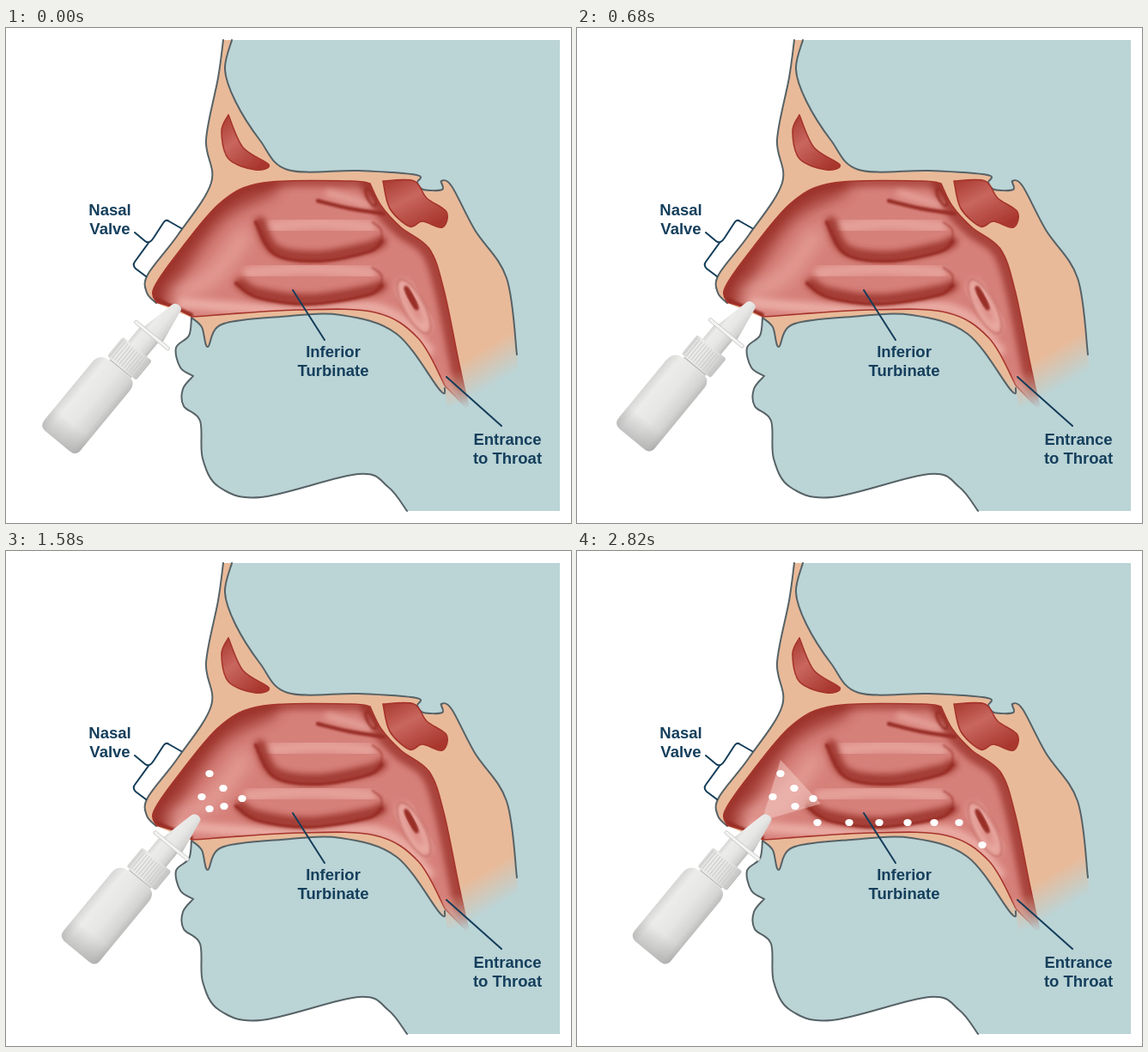
An HTML page for the animation above (3440 ms loop, 658 by 576 pixels).

```html
<!DOCTYPE html>
<html lang="en">
<head>
<meta charset="utf-8">
<title>Nasal spray</title>
<style>
html, body { margin: 0; width: 100%; height: 100%; overflow: hidden; background: #fff; }
svg { display: block; }
text { font: bold 18.5px "Liberation Sans", Arial, sans-serif; fill: #153f5c; text-anchor: middle; }
.line, .label, .dark, .light, .rim { fill: none; stroke-linecap: round; }
.line { stroke: #566266; stroke-width: 2; }
.label { stroke: #143d59; stroke-width: 2; }
.dark { stroke: #982d25; }
.light { stroke: #e9aaa3; }
.rim { stroke: #a5342c; stroke-width: 1.6; }
.b1 { filter: url(#blur1); }
.b3 { filter: url(#blur3); }
.b8 { filter: url(#blur8); }
</style>
</head>
<body>
<svg width="658" height="576" viewBox="0 0 658 576">
  <defs>
    <filter id="blur1" x="-30%" y="-30%" width="160%" height="160%"><feGaussianBlur stdDeviation="1.2"/></filter>
    <filter id="blur3" x="-30%" y="-80%" width="160%" height="260%"><feGaussianBlur stdDeviation="3.5"/></filter>
    <filter id="blur8" x="-30%" y="-60%" width="160%" height="220%"><feGaussianBlur stdDeviation="8"/></filter>
    <linearGradient id="flesh" gradientUnits="userSpaceOnUse" x1="535" y1="385" x2="557" y2="422">
      <stop stop-color="#e9ba99"/><stop offset="1" stop-color="#e9ba99" stop-opacity="0"/>
    </linearGradient>
    <linearGradient id="fade" gradientUnits="userSpaceOnUse" x1="518" y1="400" x2="530" y2="444">
      <stop stop-color="#fff"/><stop offset="1" stop-color="#000"/>
    </linearGradient>
    <linearGradient id="sinus" x2=".7" y2="1">
      <stop stop-color="#a8382f"/><stop offset=".45" stop-color="#c8665e"/><stop offset="1" stop-color="#a9372f"/>
    </linearGradient>
    <linearGradient id="plastic">
      <stop stop-color="#d6d7d5"/><stop offset=".2" stop-color="#ececeb"/><stop offset=".55" stop-color="#e6e6e5"/>
      <stop offset=".85" stop-color="#d4d4d2"/><stop offset="1" stop-color="#bcbdbb"/>
    </linearGradient>
    <linearGradient id="base" x2="0" y2="1">
      <stop offset=".75" stop-color="#999" stop-opacity="0"/><stop offset="1" stop-color="#999" stop-opacity=".5"/>
    </linearGradient>
    <clipPath id="inside"><path data-shape="cavity"/></clipPath>
    <mask id="throat" maskUnits="userSpaceOnUse" x="0" y="0" width="658" height="576">
      <rect width="658" height="576" fill="url(#fade)"/>
    </mask>
    <path id="body" d="M-28-6V-92Q-28-106-14-107H17Q27-106 27-94V-5Q27 4 18 4H-19Q-28 4-28-6Z"/>
  </defs>

  <path data-shape="head" fill="#bbd4d6"/>
  <path data-shape="face" class="line"/>
  <path data-shape="skin" fill="url(#flesh)"/>
  <path data-shape="front" class="line"/>
  <path data-shape="back" class="line"/>
  <path data-shape="floor" class="line"/>

  <g mask="url(#throat)">
    <g clip-path="url(#inside)">
      <path data-shape="cavity" fill="#d6807a"/>
      <path data-shape="roof" class="dark b3" stroke-width="15" opacity=".6"/>
      <path data-curve="172 312 205 256 245 206 300 178" class="dark b8" stroke-width="38" opacity=".8"/>
      <path data-shape="wall" class="dark b3" stroke-width="22" opacity=".75"/>
      <path data-curve="206 320 300 327 435 327 492 375" class="light b3" stroke-width="13"/>
      <path data-curve="200 308 240 290 276 244" class="light b8" stroke-width="20" opacity=".6"/>
      <path data-curve="173 316 215 334" class="dark b1" stroke-width="6"/>

      <g id="turbinates"></g>

      <path data-curve="376 192 424 206" class="light b3" stroke-width="8" opacity=".8"/>
      <path data-curve="363 201 400 210 440 216" class="dark b1" stroke-width="4.5"/>
      <ellipse class="dark b1" rx="4" ry="11" stroke-width="2.5" transform="translate(425 197) rotate(-28)"/>

      <g transform="translate(475 324) rotate(-28)">
        <ellipse class="light b3" rx="8" ry="30" stroke-width="9"/>
        <ellipse class="dark b1" rx="12" ry="35" stroke-width="1.5" opacity=".4"/>
        <ellipse class="dark b1" cx="2" cy="-10" rx="2" ry="14" stroke-width="4"/>
      </g>
    </g>
    <path data-shape="cavity" class="rim"/>
  </g>

  <path data-shape="frontal" class="rim" style="fill:url(#sinus)"/>
  <path data-shape="sphenoid" class="rim" style="fill:url(#sinus)"/>

  <path class="label" d="M204 233 190 225Q186 222 183 227L172 244Q167 252 162 248L150 238M166 250 150 272Q147 276 151 280L163 289"/>
  <path class="label" d="M334 305 371 363M513 406 577 463"/>
  <text x="121" y="218">Nasal</text><text x="121" y="240">Valve</text>
  <text x="381" y="383">Inferior</text><text x="381" y="405">Turbinate</text>
  <text x="584" y="485">Entrance</text><text x="584" y="507">to Throat</text>

  <path id="cone" d="M237 243 284 294 222 312 217 308Z" fill="#f6cfc9" fill-opacity=".5"/>
  <g id="dots" fill="#fff"></g>

  <g id="bottle">
    <g transform="translate(63 478) rotate(39.5)" fill="url(#plastic)">
      <path d="M-11-136H17V-162H-11Z"/>
      <path d="M-8-161 1-202Q2-208 8-208T14-202L21-161Z"/>
      <rect x="-20" y="-163" width="52" height="4" rx="2" fill="#f3f3f2" stroke="#c4c5c3" stroke-width=".8"/>
      <use href="#body"/>
      <use href="#body" fill="url(#base)"/>
      <rect x="-19" y="-138" width="44" height="29" rx="3"/>
      <path d="M-17-123H24" stroke="#cbccca" stroke-width="25" stroke-dasharray="1 2.6"/>
      <path d="M-14-108H19" stroke="#b9bab8" stroke-width="1.5"/>
    </g>
  </g>
</svg>
<script>
// Smooth curve through key points; "|" makes a hard corner.
function smooth(text) {
  return text.split('|').map((part, k) => {
    const n = part.trim().split(/\s+/).map(Number), p = [];
    for (let i = 0; i < n.length; i += 2) p.push([n[i], n[i + 1]]);
    let d = (k ? 'L' : 'M') + p[0];
    for (let i = 0; i < p.length - 1; i++) {
      const a = p[i - 1] || p[i], b = p[i], c = p[i + 1], e = p[i + 2] || c;
      const h1 = b.map((v, j) => v + (c[j] - a[j]) / 6);
      const h2 = c.map((v, j) => v - (e[j] - b[j]) / 6);
      d += `C${h1} ${h2} ${c}`;
    }
    return d;
  }).join('');
}

const front = '253 14 247 58 233 130 239 180 200 241 165 287 164 308 175 320';
const floor = '216 337 228 348 235 371 251 345 320 336 390 334 455 356 505 421 511 419';
const back = '595 380 583 291 546 235 519 184 507 178 508 188 486 188 479 180 478 171 410 166 328 165 296 131 267 85 255 48 263 14';
const face = '216 337 213 358 198 372 203 395 218 405|218 405 206 420 207 440 226 457 229 501 248 534 297 546 410 519 445 534 467 562';
const roof = '175 319 172 303 200 262 250 203 300 180 400 178 424 181';
const wall = '424 181 437 207 460 232 493 257 510 305 528 392 540 446';

const shapes = {
  front, floor, back, face, roof, wall,
  head: `${face}|645 562|645 14|258 14|250 60|262 130|300 250`,
  skin: `${front}|${floor}|514 440|600 425|${back}`,
  cavity: `${roof}|${wall}|511 416 480 361 430 331 340 328 217 336|195 325`,
  frontal: '259 101 251 120 259 152 290 165 306 159 276 139 259 101',
  sphenoid: '439 178 475 178 490 198 513 214 508 232 485 225 470 231 447 210 439 178'
};
const path = (cls, width, opacity, points) =>
  `<path class="${cls}" stroke-width="${width}" opacity="${opacity}" data-curve="${points.join(' ')}"/>`;

// A rounded shelf: bright top, shaded underside, dark lip.
function turbinate(left, top, height, hook) {
  const right = 437, mid = (left + right) / 2, foot = top + height, wide = right - left;
  const underside = inset => [
    left + inset, top + hook, left + wide * .15, foot - height * .18 - inset,
    mid, foot - inset, right - wide * .1, foot - height * .24 - inset, right, top + height * .5
  ];
  return path('light b3', 16, .75, [left + 16, top + 6, mid, top + 1, right - 14, top + 6])
    + path('dark b3', 13, .85, underside(5))
    + path('dark b1', 4, 1, underside(0))
    + path('dark b1', 2.5, .5, [right, top + height * .5, right, top + height * .2, right - 10, top]);
}

const $ = id => document.getElementById(id);
$('turbinates').innerHTML = turbinate(291, 226, 45, 0) + turbinate(268, 279, 42, 18);
for (const el of document.querySelectorAll('[data-shape], [data-curve]')) {
  const { shape, curve } = el.dataset;
  el.setAttribute('d', smooth(curve || shapes[shape]) + (/head|skin|cavity/.test(shape) ? 'Z' : ''));
}

const LOOP = 3440, SPRAY = 1600;
const mist = [[237, 300], [228, 286], [237, 259], [254, 297], [253, 276], [275, 288]]
  .map(([x, y], i) => ({ x, y, on: 1320 + 40 * i, off: i ? LOOP : SPRAY }));
// Drops run along the floor ever faster, and down at the throat.
const trail = Array.from({ length: 7 }, (_, i) => ({
  x: 280 + 38 * i - i * i, y: 316 + 26 * Math.max(0, i - 5),
  on: 2000 + 800 * Math.sqrt(i / 6), off: LOOP
}));
const drops = [...mist, ...trail];
$('dots').innerHTML = drops.map(({ x, y }) => `<ellipse cx="${x}" cy="${y}" rx="4.7" ry="4.1"/>`).join('');
const dots = [...$('dots').children];

const show = (el, on) => el.setAttribute('visibility', on ? 'visible' : 'hidden');
const ease = (t, from, to) => {
  const u = Math.min(1, Math.max(0, (t - from) / (to - from)));
  return u * u * (3 - 2 * u);
};

function draw(now) {
  const t = now % LOOP, push = ease(t, 560, 1080), pull = ease(t, 1100, 1300);
  $('bottle').setAttribute('transform', `translate(${28 * push - 5.5 * pull} ${-19 * push + 4.5 * pull})`);
  show($('cone'), t >= SPRAY);
  drops.forEach(({ on, off }, i) => show(dots[i], t >= on && t < off));
}
const start = performance.now();
function tick() {
  draw(performance.now() - start);
  requestAnimationFrame(tick);
}
tick();
</script>
</body>
</html>
```
